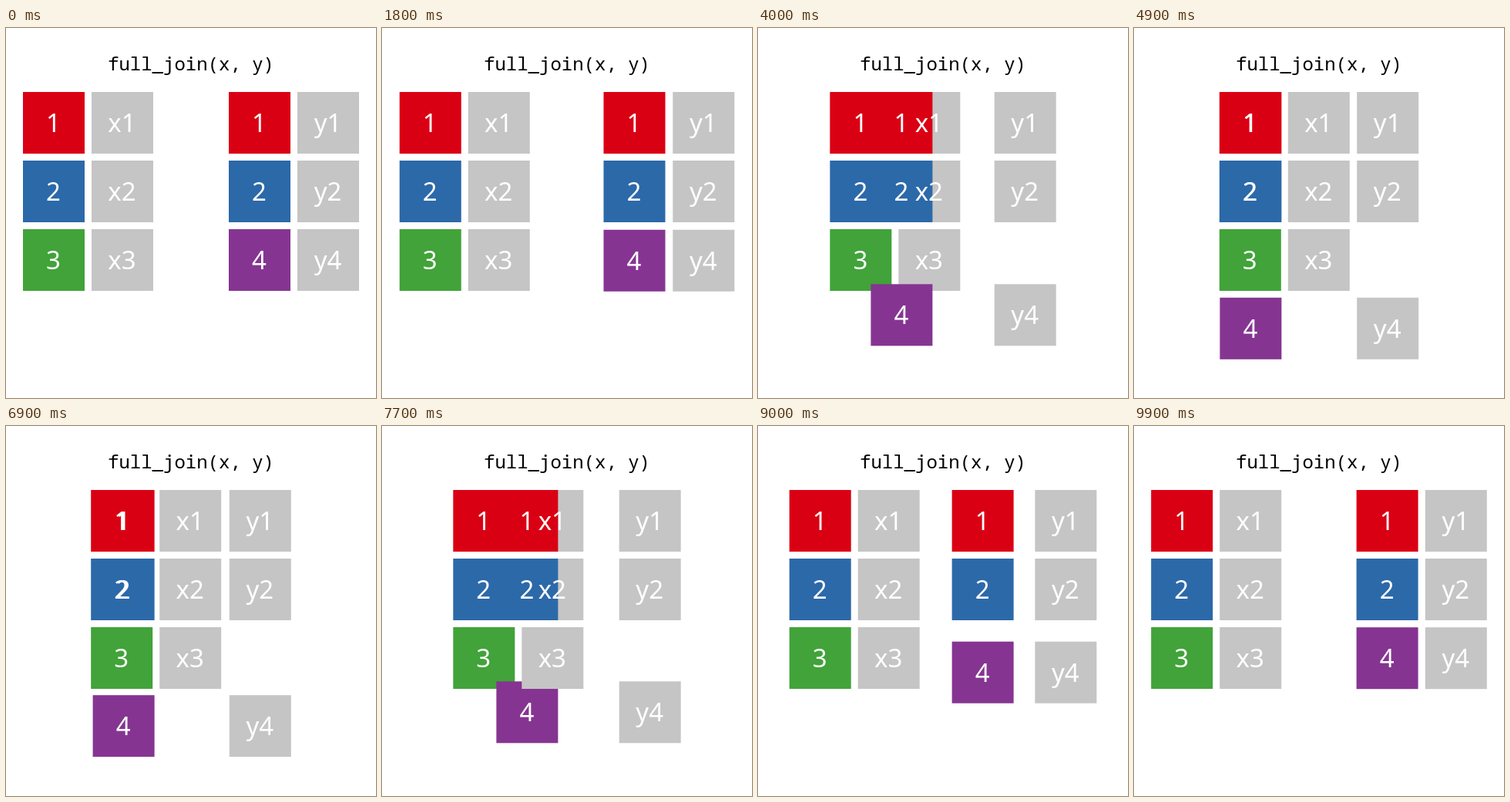
Write an HTML page with a canvas that moves like this. It is 480 px wide and 480 px high and loops after 10 s.

```html
<!DOCTYPE html>
<html>
<head>
<meta charset="utf-8">
<style>
  html, body { margin: 0; width: 100%; height: 100%; overflow: hidden; background: #fff; }
  canvas { display: block; }
</style>
</head>
<body>
<canvas id="stage" width="480" height="480"></canvas>
<script>
const ctx = document.getElementById('stage').getContext('2d');
const PITCH = 89, SIZE = 80, STEP = 100, STEPS = 100;
const colors = { 1: '#da0014', 2: '#2c69a9', 3: '#41a339', 4: '#853591' };

// Columns and rows are grid units around the stage centre.
const column = (labels, from, to, lastRow = 2) => labels.map((label, row) => ({
  label, from, to, row, endRow: row === 2 ? lastRow : row,
  color: colors[label] || '#c5c5c5'
}));
const xKeys = column(['1', '2', '3'], -2, -1);
const xVals = column(['x1', 'x2', 'x3'], -1, 0);
const yKeys = column(['1', '2', '4'], 1, -1, 3);
const yVals = column(['y1', 'y2', 'y4'], 2, 1, 3);

// The joined table stacks its tiles differently while it splits up again.
const joining = [...xKeys, ...xVals, ...yKeys, ...yVals];
const splitting = [...xKeys, yKeys[2], ...xVals, ...yVals, yKeys[0], yKeys[1]];

const ease = u => (1 - Math.cos(Math.PI * Math.min(1, Math.max(0, u)))) / 2;
const mix = (a, b, p) => a + (b - a) * p;

function draw(step) {
  const p = ease((step - 16) / 34) - ease((step - 67) / 33);
  const tiles = (step < 67 ? joining : splitting).map(t => ({
    ...t,
    x: 240 + PITCH * mix(t.from, t.to, p),
    y: 123 + PITCH * mix(t.row, t.endRow, p)
  }));

  ctx.fillStyle = '#fff';
  ctx.fillRect(0, 0, 480, 480);
  for (const t of tiles) {
    ctx.fillStyle = t.color;
    ctx.fillRect(t.x - SIZE / 2, t.y - SIZE / 2, SIZE, SIZE);
  }

  ctx.textAlign = 'center';
  ctx.fillStyle = '#fff';
  ctx.font = '33px "Noto Sans", "Open Sans", sans-serif';
  for (const t of tiles) ctx.fillText(t.label, t.x - 0.5, t.y + 12);

  ctx.fillStyle = '#000';
  ctx.font = '24px "Noto Sans Mono", "DejaVu Sans Mono", monospace';
  ctx.fillText('full_join(x, y)', 240, 55);
}

function tick() {
  draw(Math.floor(performance.now() / STEP) % STEPS);
  requestAnimationFrame(tick);
}
tick();
</script>
</body>
</html>
```
